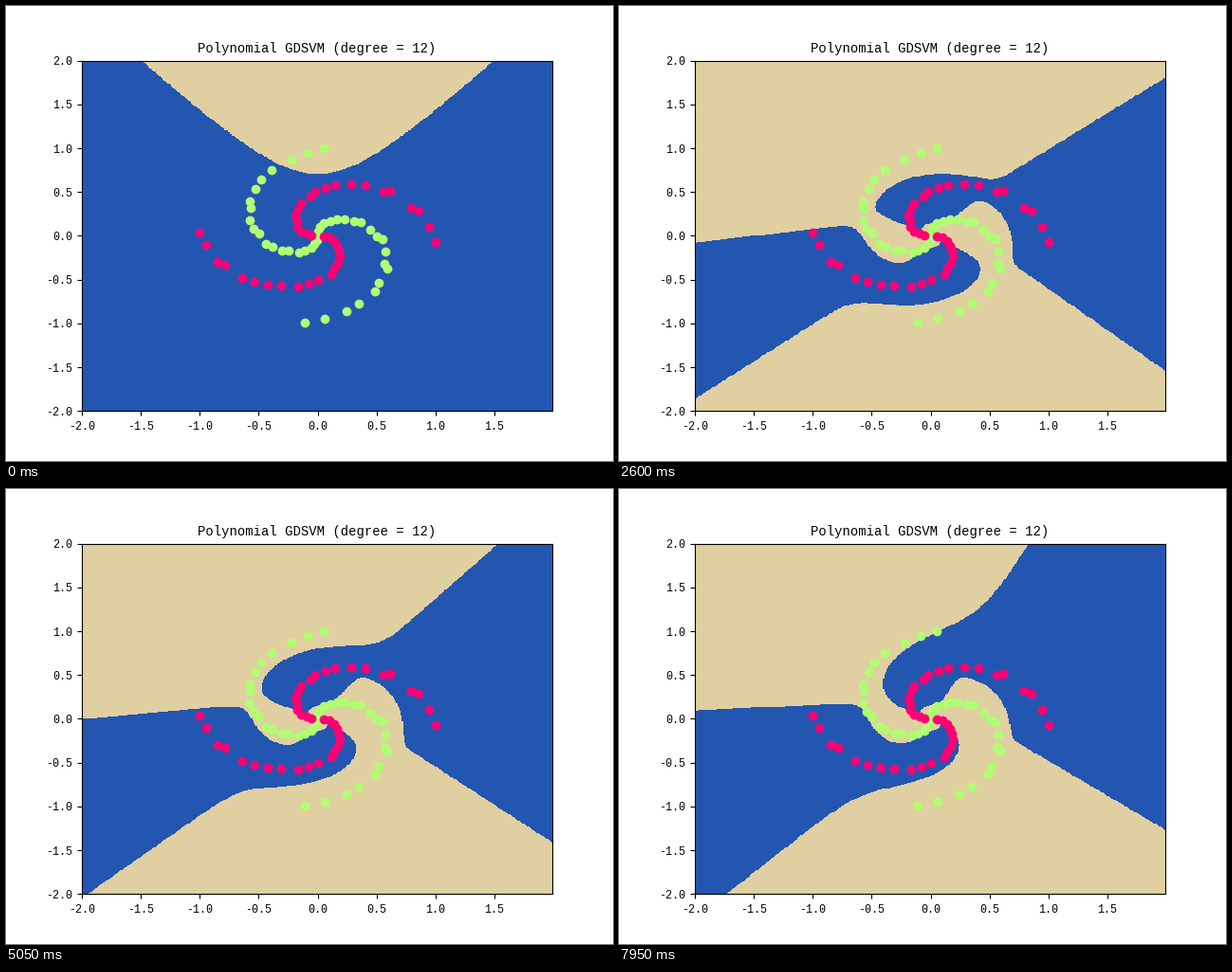
Animation of 640 by 480 pixels, one loop 8 s. Source, as a matplotlib script:

```python
import numpy as np
import matplotlib.pyplot as plt
from matplotlib.animation import FuncAnimation
from matplotlib.colors import ListedColormap

FRAMES, STEP = 160, 50
BLUE, TAN = "#2356b0", "#e0cfa0"
RED, LIME = "#ff0074", "#b0ff72"
KEYS = [1.35, 2.6, 4.2, 5.95, 7.15, 7.95]  # seconds

plt.rcParams["font.family"] = "Liberation Mono"
plt.rcParams["axes.unicode_minus"] = False

fig = plt.figure(figsize=(6.4, 4.8), dpi=100, facecolor="white")
ax = fig.add_subplot()

# Polar coordinates of the grid; edges are looked up by radius.
x, y = np.meshgrid(np.linspace(-2, 1.99, 400), np.linspace(-2, 2, 401))
theta = np.degrees(np.arctan2(y, x))
ring = (np.hypot(x, y) * 400).astype(int)
r = np.maximum(np.arange(ring.max() + 1) / 400, 0.01)
core = 120 * np.exp(-(r / 0.14) ** 4)  # closes the spiral near the centre
bowl = np.degrees(np.arcsin(np.sqrt(np.minimum(1, (1.56 + 0.49 / r**2) / 2.56))))


def edge(inner, outer, bend, radius, width):
    """Angle of a boundary by radius: a soft step from bulb to wing."""
    s = 1 / (1 + np.exp(np.clip((r - radius) / width, -50, 50)))
    return inner * s + (outer + bend / r) * (1 - s)


def between(low, high):
    return (theta - low[ring]) % 360 < (high - low)[ring]


def regions(t):
    """True where the classifier answers blue at t seconds."""
    p = np.clip((t - KEYS[0]) / (KEYS[-1] - KEYS[0]), 0, 1)

    def drift(a, b):
        return a + (b - a) * p

    def keyed(*values):
        return np.interp(t, KEYS, values)

    right_top = edge(drift(150, 158), keyed(26, 39.5, 46.5, 53, 55.5, 64), 7,
                     keyed(0.6, 0.68, 0.67, 0.82, 0.73, 0.73),
                     keyed(0.07, 0.04, 0.05, 0.1, 0.06, 0.17))
    right_low = core + edge(drift(42, 64), drift(-44.5, -38.5), 14,
                            keyed(0.71, 0.66, 0.77, 0.6, 0.62, 0.62), 0.03)
    left_top = core + edge(240, drift(190, 184), -13, drift(0.52, 0.48), 0.05)
    left_low = edge(-33, drift(-141, -133.5), 7, drift(0.78, 0.57),
                    drift(0.06, 0.15))

    # The first descent splits one blue field under a bowl into two wings.
    w = max(0, 1 - t / KEYS[0]) ** 4
    right_top = w * bowl + (1 - w) * right_top
    left_top = w * (180 - bowl) + (1 - w) * left_top
    right_low = w * -90 + (1 - w) * right_low
    left_low = w * -90 + (1 - w) * left_low
    return between(right_low, right_top) | between(left_top, left_low + 360)


image = ax.imshow(regions(0), cmap=ListedColormap([TAN, BLUE]), vmin=0, vmax=1,
                  origin="lower", extent=(-2.005, 1.995, -2.005, 2.005),
                  interpolation="nearest", aspect="auto")

rng = np.random.default_rng(4)
radii = np.linspace(0.05, 1, 20)
for arm in range(4):
    a = np.radians(185.5 + 90 * arm - 188 * radii + rng.normal(0, 2, 20))
    ax.scatter(radii * np.cos(a), radii * np.sin(a),
               color=LIME if arm % 2 else RED, zorder=3 - arm % 2)

ax.set_xlim(-2, 1.99)
ax.set_ylim(-2, 2)
ax.set_xticks(np.arange(-2, 1.6, 0.5))
ax.set_yticks(np.arange(-2, 2.1, 0.5))
ax.tick_params(labelsize=8.35)
ax.tick_params(axis="x", pad=4.5)
ax.set_title("Polynomial GDSVM (degree = 12)", fontsize=10)


def draw(i):
    image.set_data(regions(i * STEP / 1000))
    return [image]


anim = FuncAnimation(fig, draw, frames=FRAMES, interval=STEP,
                     repeat=True, repeat_delay=0)
plt.show()
```
